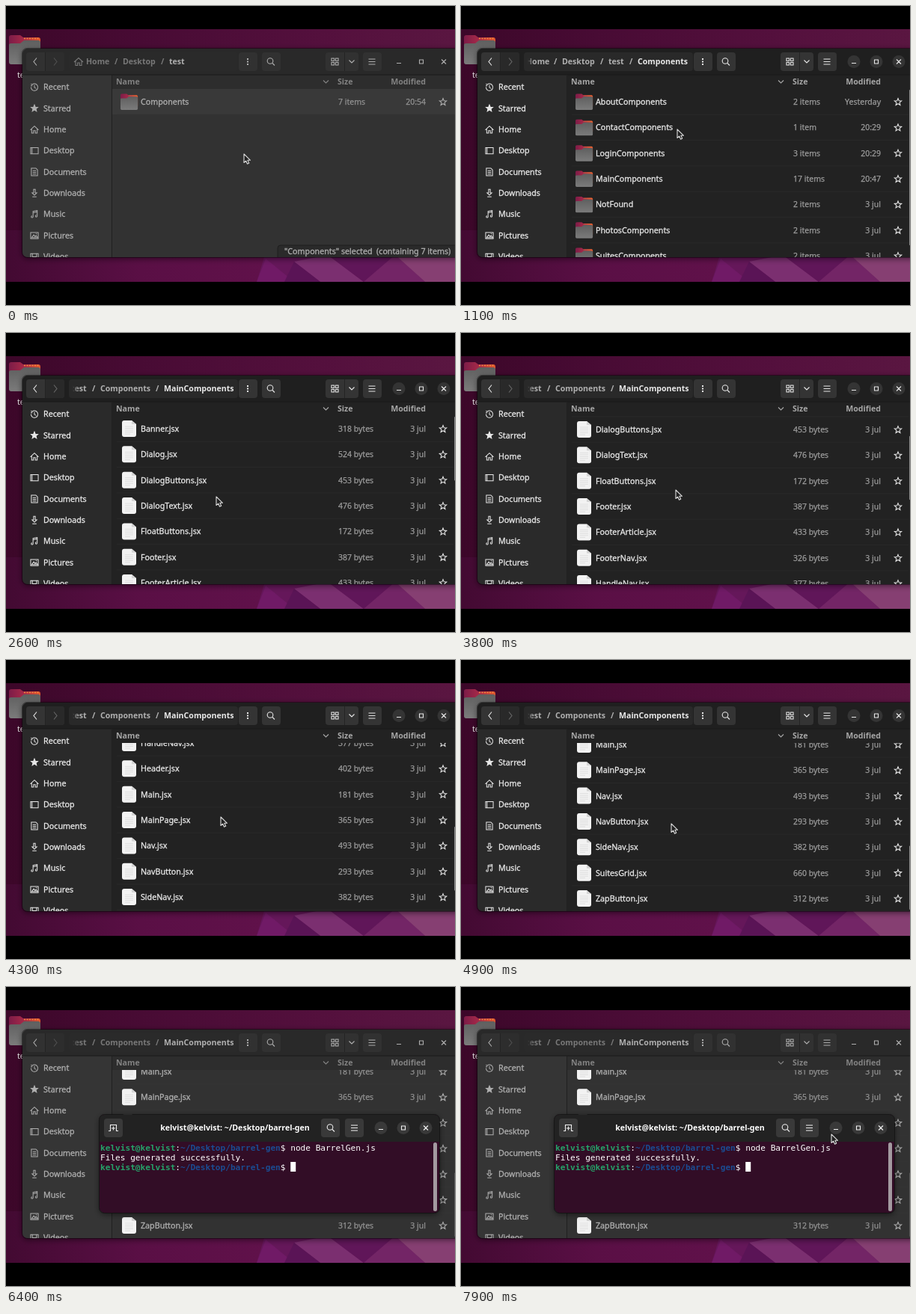
Recreate the animation shown at these times as an HTML page. Size 600 by 400 pixels, loop 8000 ms.

```html
<!DOCTYPE html>
<html lang="en">
<head>
<meta charset="utf-8">
<title>Browsing folders</title>
<style>
html, body { margin: 0; width: 100%; height: 100%; overflow: hidden; background: #000; }
svg { display: block; width: 600px; height: 400px; }
text { font: 500 10.5px "Noto Sans", "Open Sans", sans-serif; white-space: pre; }
.bold { font-weight: 700; font-size: 10.6px; }
.files {
  --head: #1f1f1f; --side: #2a2a2a; --view: #242424; --cols: #222; --rule: #292929; --thumb: #8a8a8a;
  --button: #343434; --muted: #292929; --entry: #292929; --text: #e8e8e8; --soft: #9c9c9c; --label: #a6a6a6; --crumb: #b0b0b0; --off: #686868;
}
.files.dim {
  --head: #292929; --side: #353535; --view: #313131; --cols: #2d2d2d; --rule: #343434; --thumb: #555;
  --button: #313131; --muted: #2d2d2d; --entry: #2a2a2a; --text: #afafaf; --soft: #929292; --label: #828282; --crumb: #787878; --off: #505050;
}
.files.dim .disc { display: none; }
.line { fill: none; stroke: var(--text); stroke-width: 1.1; }
.main { fill: var(--text); }
text.main:not(.bold) { font-size: 10.7px; stroke: var(--text); stroke-width: .3; }
.soft { fill: var(--soft); }
text.soft { stroke: var(--soft); stroke-width: .25; }
.label { fill: var(--label); }
.crumb { fill: var(--crumb); }
.button { fill: var(--button); }
.term text { font: 11.11px "DejaVu Sans Mono", monospace; fill: #fff; }
.term text.title { font: 700 10.6px "Noto Sans", "Open Sans", sans-serif; }
.term { --text: #f2f2f2; --button: #393939; }
.term .user { fill: #26a269; font-weight: 700; }
.term .path { fill: #1b4c92; font-weight: 700; }
</style>
</head>
<body>
<svg id="stage" viewBox="0 0 600 400">
  <defs>
    <linearGradient id="wall">
      <stop offset="0" stop-color="#3c0729"/><stop offset=".3" stop-color="#480b34"/>
      <stop offset=".7" stop-color="#54103d"/><stop offset="1" stop-color="#5a1641"/>
    </linearGradient>
    <linearGradient id="floor">
      <stop offset="0" stop-color="#430a32"/><stop offset=".3" stop-color="#5a0f45"/><stop offset="1" stop-color="#691452"/>
    </linearGradient>
    <linearGradient id="flap">
      <stop offset="0" stop-color="#7c1c48"/><stop offset=".5" stop-color="#a82a48"/><stop offset="1" stop-color="#e2582c"/>
    </linearGradient>
    <linearGradient id="front" x2="0" y2="1">
      <stop offset="0" stop-color="#5f5f5f"/><stop offset="1" stop-color="#7b7b7b"/>
    </linearGradient>
    <linearGradient id="fade">
      <stop offset="0" stop-color="#fff" stop-opacity="0"/><stop offset="1" stop-color="#fff"/>
    </linearGradient>
    <filter id="shadow" x="-10%" y="-10%" width="120%" height="130%">
      <feDropShadow dx="0" dy="2" stdDeviation="4" flood-color="#000" flood-opacity=".55"/>
    </filter>
    <clipPath id="windowClip"><rect x="22" y="57" width="590" height="279" rx="7"/></clipPath>
    <clipPath id="listClip"><path d="M141 111H600V336H141Z"/></clipPath>
    <mask id="crumbMask" maskUnits="userSpaceOnUse" x="84" y="57" width="226" height="36">
      <rect x="89" y="57" width="8" height="36" fill="url(#fade)"/><rect x="97" y="57" width="213" height="36" fill="#fff"/>
    </mask>
    <g id="folder">
      <path d="M0 3Q0 0 3 0H15L19 3H39Q42 3 42 6V30H0Z" fill="url(#flap)"/>
      <path d="M20 4.5H41" stroke="#f08a3c" stroke-width="1.5" stroke-dasharray="2 1.5"/>
      <path d="M0 13Q0 11 3 11H15L20 7H39Q42 7 42 10V36Q42 39 39 39H3Q0 39 0 36Z" fill="url(#front)"/>
    </g>
    <g id="sheet">
      <path d="M3 0H13L19 5V19Q19 22 16 22H3Q0 22 0 19V3Q0 0 3 0Z" fill="#f2f2f2"/>
      <path d="M13 0V5H19Z" fill="#d4d4d4"/>
      <path d="M4 8H15M4 10.5H15M4 13H15M4 15.5H15M4 18H11" stroke="#dedede"/>
    </g>
  </defs>

  <rect width="600" height="400"/>
  <rect y="31" width="600" height="270" fill="url(#wall)"/>
  <rect y="300" width="600" height="69" fill="url(#floor)"/>
  <path d="M335 369L345 336H600V369Z" fill="#65175a"/>
  <path d="M335 369L347 338L385 369Z" fill="#701a66"/>
  <path d="M385 342L430 333L478 369H420Z" fill="#7b2f70"/>
  <path d="M385 342L420 369H372Z" fill="#5a1456"/>
  <path d="M430 333H520L478 369Z" fill="#601659"/>
  <path d="M520 333L560 369H478Z" fill="#732566"/>
  <path d="M520 333H600V369H560Z" fill="#863f72"/>
  <use href="#folder" x="4" y="39"/>
  <text x="15" y="96" fill="#eee">test</text>

  <g id="files" class="files">
    <rect x="22" y="57" width="590" height="279" rx="7" fill="var(--view)" filter="url(#shadow)"/>
    <g clip-path="url(#windowClip)">
      <path d="M22 92H141V336H22Z" fill="var(--side)"/>
      <g id="sidebar"></g>
      <g id="list" clip-path="url(#listClip)"></g>
      <path d="M141 92H600V111H141Z" fill="var(--cols)"/>
      <g class="label">
        <text class="bold" x="147" y="105">Name</text>
        <text class="bold" x="443" y="105">Size</text>
        <text class="bold" x="561" y="105" text-anchor="end">Modified</text>
      </g>
      <path class="line" d="M424 99.5L427.500 103L431 99.500" style="stroke:var(--label)"/>
      <path d="M22 57H600V92H22Z" fill="var(--head)"/>
      <path d="M22 92H600" stroke="#191919"/>
      <path d="M141.500 92V336" stroke="#202020"/>
      <g class="button">
        <rect x="27" y="62" width="51" height="25" rx="4"/>
        <rect x="311" y="62" width="25" height="25" rx="4"/>
        <rect x="342" y="62" width="25" height="25" rx="4"/>
        <rect x="427" y="62" width="44" height="25" rx="4"/>
        <rect x="477" y="62" width="25" height="25" rx="4"/>
      </g>
      <path d="M53 62H74Q78 62 78 66V83Q78 87 74 87H53Z" fill="var(--muted)"/>
      <rect x="84" y="62" width="226" height="25" rx="4" fill="var(--entry)"/>
      <path d="M52.500 62V87M452.500 62V87" stroke="#232323"/>
      <path class="line" d="M41 69.500L37 74.500L41 79.500"/>
      <path class="line" d="M64 69.500L68 74.500L64 79.500" style="stroke:var(--off)"/>
      <path class="main" d="M322 70h2v2h-2zM322 73.500h2v2h-2zM322 77h2v2h-2z"/>
      <path class="line" d="M435 70h3.500v3.500h-3.500zM440.500 70h3.500v3.500h-3.500zM435 75.500h3.500v3.500h-3.500zM440.500 75.500h3.500v3.500h-3.500z"/>
      <path class="line" d="M458.500 72.500L462 76L465.500 72.500"/>
      <g id="fileControls"></g>
      <g id="crumbs"></g>
      <rect id="thumb" x="599" width="2" rx="1" fill="var(--thumb)"/>
      <g id="status">
        <path d="M363 340V324Q363 320 367 320H604V340Z" fill="#2a2a2a" stroke="#1e1e1e"/>
        <text class="main" x="372" y="331.500">"Components" selected  (containing 7 items)</text>
      </g>
    </g>
    <path d="M600 56.500H29Q21.500 56.500 21.500 64V329Q21.500 336.500 29 336.500H600" fill="none" stroke="#000" stroke-opacity=".4"/>
  </g>

  <g id="term" class="term">
    <rect x="125" y="171" width="454" height="131" rx="7" fill="#300826" filter="url(#shadow)"/>
    <path d="M125 207V178Q125 171 132 171H572Q579 171 579 178V207Z" fill="#222"/>
    <g class="button">
      <rect x="131" y="176" width="25" height="25" rx="4"/>
      <rect x="421" y="176" width="25" height="25" rx="4"/>
      <rect x="453" y="176" width="25" height="25" rx="4"/>
    </g>
    <path class="line" d="M137 192.500H139.500V184.500H147.500V192.500H150M143.500 186.500V191.500M141 189H146"/>
    <text class="title" x="306" y="192" text-anchor="middle"></text>
    <g id="termControls"></g>
    <text id="line0" x="126" y="218.500"></text>
    <text id="line1" x="126" y="231.500">Files generated successfully.</text>
    <text id="line2" x="126" y="244.500"></text>
    <rect id="caret" width="7" height="13" fill="#fff"/>
    <rect x="571" y="208" width="5" height="92" rx="2.500" fill="#a39aa0"/>
    <rect x="124.500" y="170.500" width="455" height="132" rx="7" fill="none" stroke="#111" stroke-opacity=".75"/>
  </g>

  <path id="pointer" d="M0 0V11.500L2.700 9.100L4.500 13.300L6.700 12.300L4.900 8.300H8.500Z" fill="#222" stroke="#dcdcdc" stroke-width="1.100" stroke-linejoin="round"/>
  <path d="M0 0H600V31H0ZM0 369H600V400H0Z"/>
</svg>
<script>
const LOOP = 8000, PITCH = 34.35, TOP = 111, VIEW = 225;
const USER = "kelvist@kelvist", DIR = "~/Desktop/barrel-gen", COMMAND = "node BarrelGen.js";
const CHAR = 6.69;
const el = id => document.getElementById(id);
const clamp = x => Math.max(0, Math.min(1, x));
const ramp = (t, from, to) => clamp((t - from) / (to - from));
const smooth = x => x * x * (3 - 2 * x);
const show = (node, on) => { node.style.display = on ? "" : "none"; };
const label = (x, y, str, cls, extra = "") => `<text x="${x}" y="${y}" class="${cls}" ${extra}>${str}</text>`;

const starPath = "M" + Array.from({ length: 10 }, (_, i) => {
  const r = i % 2 ? 2.3 : 5.2, a = i * Math.PI / 5;
  return `${(r * Math.sin(a)).toFixed(2)} ${(-r * Math.cos(a)).toFixed(2)}`;
}).join("L") + "Z";
const house = "M-6 .5L0-5L6 .5M-4-1V5H-1.300V1.500H1.300V5H4V-1";

const places = [
  ["Recent", "M-5 0A5 5 0 1 0-3.500-3.500L-5-5M-5.500-2H-3M0-3V.5L2.500 2"],
  ["Starred", starPath],
  ["Home", house],
  ["Desktop", "M-5.500-4.500H5.500V4.500H-5.500ZM-3.500-4V4"],
  ["Documents", "M-4.500-5.500H2L4.500-3V5.500H-4.500ZM-2.500-2H2.500M-2.500.5H2.500M-2.500 3H2.500"],
  ["Downloads", "M-1.200-5.500H1.200V-.5H3.500L0 3L-3.500-.5H-1.200ZM-3 5.300H3"],
  ["Music", "M-2 3.500V-4.500L4-5.500V2.500M-2-2.500L4-3.500M-2 3.500a1.300 1.300 0 1 1-1.300-1.300M4 2.500a1.300 1.300 0 1 1-1.300-1.300"],
  ["Pictures", "M-5.500-4.500H5.500V4.500H-5.500ZM-4 3L-1-1L1 1.500L2.500 0L4.500 3ZM2-2.500h1.500"],
  ["Videos", "M-5.500-4.500H5.500V4.500H-5.500ZM-3-4.500V4.500M3-4.500V4.500M-3 0H3"]
];
el("sidebar").innerHTML = places.map(([name, icon], i) => {
  const y = 108.3 + i * 28.35;
  const fill = name === "Starred" ? "fill:var(--text)" : "";
  return `<path class="line" style="${fill}" transform="translate(38 ${y + .3}) scale(.92)" d="${icon}"/>` + label(50, y + 4, name, "main");
}).join("");

// Search, menu and window buttons share one layout in both headers.
const controls = (search, menu, discs, y) => `
  <circle class="line" cx="${search - 1}" cy="${y - 1}" r="3.800"/><path class="line" d="M${search + 2} ${y + 2}l3 3"/>
  <path class="line" d="M${menu - 4.5} ${y - 3.5}h9m-9 3.500h9m-9 3.500h9"/>
  ${discs.map(x => `<circle class="disc button" cx="${x}" cy="${y}" r="8.500"/>`).join("")}
  <path class="line" d="M${discs[0] - 3} ${y + 2}h6M${discs[1] - 2.5} ${y - 2.5}h5v5h-5zM${discs[2] - 3} ${y - 3}l6 6m0-6l-6 6"/>`;
el("fileControls").innerHTML = controls(354, 489, [525, 555, 585], 74.5);
el("termControls").innerHTML = controls(434, 465.5, [501, 531, 561], 188.5);

const rowList = (text, suffix, unit, date) => text.split(" ").map(item => {
  const [name, size, day = date] = item.split("|");
  return { name: name + suffix, size: size + (size === "1" ? " item" : unit), day };
});
const folders = {
  test: rowList("Components|7|20:54", "", " items"),
  components: rowList("AboutComponents|2|Yesterday ContactComponents|1|20:29 LoginComponents|3|20:29 MainComponents|17|20:47 NotFound|2 PhotosComponents|2 SuitesComponents|2", "", " items", "3 jul"),
  main: rowList("Banner|318 Dialog|524 DialogButtons|453 DialogText|476 FloatButtons|172 Footer|387 FooterArticle|433 FooterNav|326 HandleNav|377 Header|402 Main|181 MainPage|365 Nav|493 NavButton|293 SideNav|382 SuitesGrid|660 ZapButton|312", ".jsx", " bytes", "3 jul")
};
const rowMarkup = ({ name, size, day }, i) => {
  const y = 128 + i * PITCH;
  const icon = name.endsWith(".jsx")
    ? `<use href="#sheet" x="155" y="${y - 11}"/>`
    : `<use href="#folder" transform="translate(153 ${y - 10.5}) scale(.55)"/>`;
  return `${icon}${label(180, y + 4, name, "main")}${label(444, y + 4, size, "soft")}
    ${label(561, y + 4, day, "soft", 'text-anchor="end"')}
    <path class="line" transform="translate(584 ${y + .5}) scale(.95)" d="${starPath}"/>
    <path d="M148 ${y + 17.2}H598" stroke="var(--rule)"/>`;
};
el("list").innerHTML = Object.entries(folders).map(([key, rows]) =>
  `<g id="list-${key}">${key === "test" ? '<path d="M142 111H600V145H142Z" fill="#393939"/>' : ""}${rows.map(rowMarkup).join("")}</g>`).join("");

const trails = {
  test: [[107, "Home"], [147, "/"], [156, "Desktop"], [209, "/"], [218, "test"]],
  components: [[87, "Home"], [126, "/"], [135, "Desktop"], [188, "/"], [197, "test"], [227, "/"], [236, "Components"]],
  main: [[87, "test"], [117, "/"], [126, "Components"], [202, "/"], [211, "MainComponents"]]
};
el("crumbs").innerHTML = Object.entries(trails).map(([key, parts]) => {
  const words = parts.map(([x, word], i) => i === parts.length - 1
    ? label(x, 78.3, word, "main bold")
    : label(word === "/" ? x - 2 : x, 78.3, word, "crumb bold")).join("");
  const home = key === "test" ? `<path class="line" style="stroke:var(--crumb)" transform="translate(97 74.500)" d="${house}"/>` : "";
  return `<g id="crumbs-${key}" ${home ? "" : 'mask="url(#crumbMask)"'}>${home}${words}</g>`;
}).join("");

const prompt = `<tspan class="user">${USER}</tspan>:<tspan class="path">${DIR}</tspan>$ `;
const promptLength = USER.length + DIR.length + 3;
document.querySelector(".title").textContent = `${USER}: ${DIR}`;
el("line2").innerHTML = prompt;

const pointerPath = [
  [0, 318, 198], [80, 318, 198], [300, 289, 165], [1350, 289, 165], [2100, 281, 219],
  [3350, 281, 219], [3500, 287, 210], [4400, 287, 210], [4700, 281, 219],
  [7250, 281, 219], [7800, 495, 197], [LOOP, 495, 197]
];
function pointerAt(t) {
  const i = pointerPath.findIndex(p => p[0] > t);
  const [t0, x0, y0] = pointerPath[i - 1], [t1, x1, y1] = pointerPath[i];
  const k = smooth(ramp(t, t0, t1));
  return [x0 + (x1 - x0) * k, y0 + (y1 - y0) * k];
}

function drawFiles(t) {
  const open = t < 500 ? "test" : t < 2300 ? "components" : "main";
  const limit = open === "main" ? 358.6 : 15;
  const scroll = open === "test" ? 0
    : open === "main" ? limit * ramp(t, 3650, 4450)
    : limit * smooth(ramp(t, 1400, 2000));
  for (const key in folders) {
    show(el("list-" + key), key === open);
    show(el("crumbs-" + key), key === open);
  }
  el("list-" + open).setAttribute("transform", `translate(0 ${-scroll})`);
  el("files").classList.toggle("dim", t < 500 || t >= 5500);
  show(el("status"), open === "test");
  const track = VIEW - 3, length = track * VIEW / (VIEW + limit);
  show(el("thumb"), open !== "test");
  el("thumb").setAttribute("y", TOP + 1 + (track - length) * scroll / limit);
  el("thumb").setAttribute("height", length);
}

function drawTerminal(t) {
  const grow = smooth(ramp(t, 5480, 5620)), scale = .9 + .1 * grow;
  show(el("term"), t >= 5500);
  el("term").setAttribute("opacity", grow);
  el("term").setAttribute("transform", `translate(352 236) scale(${scale}) translate(-352 -236)`);
  const typed = Math.floor(COMMAND.length * ramp(t, 5700, 6200)), done = t >= 6300;
  el("line0").innerHTML = prompt + COMMAND.slice(0, typed);
  show(el("line1"), done);
  show(el("line2"), done);
  el("caret").setAttribute("x", 126 + CHAR * (promptLength + (done ? 0 : typed)));
  el("caret").setAttribute("y", done ? 234 : 208);
}

function draw(t) {
  drawFiles(t);
  drawTerminal(t);
  const [x, y] = pointerAt(t);
  el("pointer").setAttribute("transform", `translate(${x} ${y})`);
  show(el("pointer"), t < 5700 || t >= 7300);
}

const start = performance.now();
function tick() {
  draw((performance.now() - start) % LOOP);
  requestAnimationFrame(tick);
}
tick();
</script>
</body>
</html>
```
